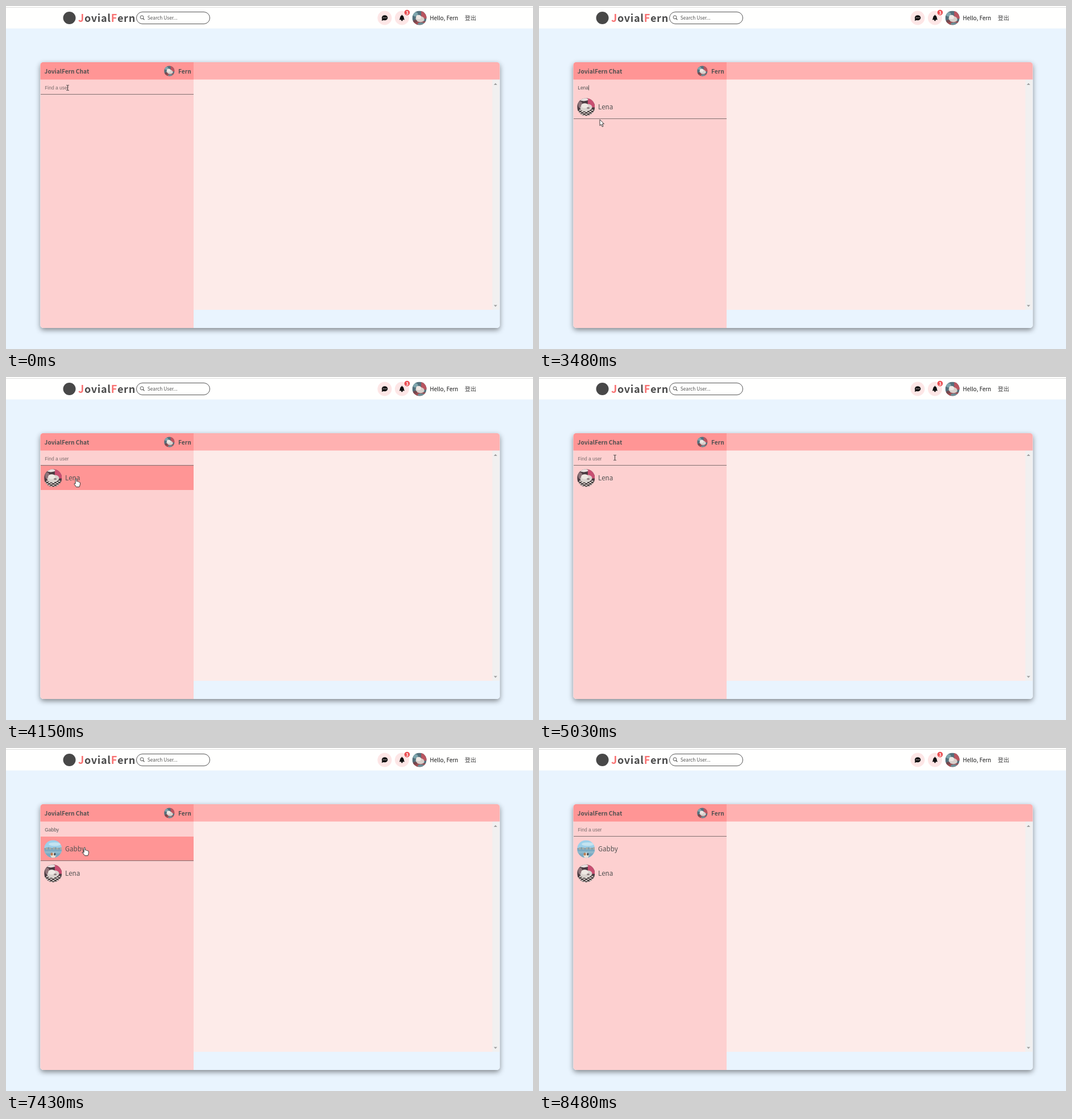
An HTML page with a canvas for the animation above (9.48 s loop, 927 px wide and 604 px high).

```html
<!DOCTYPE html>
<html lang="en">
<head>
<meta charset="utf-8">
<title>JovialFern Chat</title>
<style>
html, body { margin: 0; width: 100%; height: 100%; overflow: hidden; background: #e9f4fe; }
canvas { display: block; width: 927px; height: 604px; }
</style>
</head>
<body>
<canvas id="stage" width="927" height="604"></canvas>
<script>
const ctx = document.getElementById('stage').getContext('2d');
const LOOP = 9480;
const UI = '"Noto Sans CJK TC", "Noto Sans CJK JP", "Noto Sans CJK", sans-serif';
const FIELD = '"Liberation Sans", Arial, sans-serif';
const INK = '#505050', CORAL = '#ff9595', PINK = '#fdd0d0', SKY = '#e9f4fe';
const LEFT = 61, SPLIT = 330, ROW_TOP = 156, ROW_H = 43;

// Pointer hotspot stops: time, x, y
const POINTER = [
  [0, 108, 144], [3060, 108, 144], [3480, 107, 200], [3610, 107, 200],
  [3900, 123, 179], [4200, 123, 179], [4640, 133, 142], [6680, 133, 142],
  [7430, 138, 175], [7640, 138, 175], [8100, 56, 322]
];

// Search field contents from each time on
const TYPED = [
  [0, ''], [840, 'L'], [1220, 'Le'], [1840, 'Len'], [2100, 'Lena'], [4030, ''],
  [5870, 'G'], [5940, 'Ga'], [6010, 'Gabb'], [6080, 'Gabby'], [7640, '']
];

const CARET_ON = [
  [250, 800], [840, 1760], [1840, 2640], [3180, 3710],
  [4500, 5030], [5580, 6420], [6950, 7300]
];

function rect(color, x, y, w, h) {
  ctx.fillStyle = color;
  ctx.fillRect(x, y, w, h);
}

function oval(color, x, y, rx, ry = rx, turn = 0) {
  ctx.fillStyle = color;
  ctx.beginPath();
  ctx.ellipse(x, y, rx, ry, turn, 0, Math.PI * 2);
  ctx.fill();
}

function text(str, x, y, size, weight = 400, color = INK, family = UI) {
  ctx.font = `${weight} ${size}px ${family}`;
  ctx.fillStyle = color;
  ctx.fillText(str, x, y);
  return x + ctx.measureText(str).width;
}

function line(color, width, ...points) {
  ctx.strokeStyle = color;
  ctx.lineWidth = width;
  ctx.beginPath();
  points.forEach(([x, y]) => ctx.lineTo(x, y));
  ctx.stroke();
}

function polygon(color, ...points) {
  ctx.fillStyle = color;
  ctx.beginPath();
  points.forEach(([x, y]) => ctx.lineTo(x, y));
  ctx.closePath();
  ctx.fill();
}

// Paints a round picture in unit-circle coordinates
function avatar(x, y, r, paint) {
  ctx.save();
  ctx.beginPath();
  ctx.arc(x, y, r, 0, Math.PI * 2);
  ctx.clip();
  ctx.translate(x, y);
  ctx.scale(r, r);
  paint();
  ctx.restore();
}

function fernPhoto() {
  rect('#53707c', -1, -1, 2, 2);
  rect('#b9545f', 0.25, -1, 0.8, 1.1);
  oval('#7fa6ad', -0.55, -0.5, 0.35, 0.3);
  rect('#a34b50', -1, 0.5, 2, 0.5);
  oval('#d9d0cc', 0.08, 0.15, 0.62, 0.42, 0.2);
  oval('#efe7e3', -0.12, -0.12, 0.35, 0.3);
  oval('#75494f', -0.6, 0.45, 0.28, 0.2);
  oval('#6c8d96', 0.25, 0.82, 0.5, 0.2);
}

function lenaPhoto() {
  rect('#493a40', -1, -1, 2, 2);
  rect('#c94f72', 0.2, -1, 0.8, 1.05);
  oval('#e8e0df', -0.25, -0.85, 0.5, 0.18);
  oval('#8e7479', -0.65, -0.25, 0.25, 0.4);
  for (let i = 0; i < 9; i++) {
    for (let j = 0; j < 5; j++) {
      rect((i + j) % 2 ? '#d8d1cc' : '#3b3333', -1 + i * 0.23, 0.3 + j * 0.15, 0.23, 0.15);
    }
  }
  oval('#d9d3ce', 0.02, 0.08, 0.68, 0.42, -0.15);
  oval('#eee8e3', -0.15, -0.15, 0.4, 0.28);
  oval('#87777a', 0.25, 0.12, 0.16, 0.09);
}

function gabbyPhoto() {
  rect('#9dd0ea', -1, -1, 2, 2);
  oval('#c4e3f0', 0.2, -0.55, 0.7, 0.2);
  rect('#79a9c2', -1, 0.05, 2, 1);
  for (let i = 0; i < 10; i++) {
    const h = 0.16 + 0.1 * Math.abs(Math.sin(i * 2.3));
    rect(i % 2 ? '#a9a99f' : '#7f9ba6', -1 + i * 0.2, 0.06 - h, 0.18, h);
  }
  rect('#8fb9cb', -1, 0.25, 2, 0.25);
  oval('#e9e3d8', 0.02, 0.72, 0.3, 0.3);
  oval('#b77b52', -0.14, 0.58, 0.14, 0.17);
  oval('#46525a', 0.2, 0.6, 0.11, 0.15);
}

const PEOPLE = { Lena: lenaPhoto, Gabby: gabbyPhoto };

function drawNav() {
  rect('#fffffe', 0, 0, 927, 39.5);
  rect('#dedede', 0, 2, 927, 1);

  oval('#484848', 111.5, 21, 11);
  ctx.letterSpacing = '0.7px';
  let x = 127;
  for (const [part, color] of [['J', '#f87171'], ['ovial', '#4a4a4a'], ['F', '#f87171'], ['ern', '#4a4a4a']]) {
    x = text(part, x, 28, 18, 700, color);
  }
  ctx.letterSpacing = '0px';

  ctx.strokeStyle = '#555';
  ctx.lineWidth = 1;
  ctx.beginPath();
  ctx.roundRect(229.5, 10.5, 129, 21, 10.5);
  ctx.stroke();
  ctx.beginPath();
  ctx.arc(239, 19.8, 2.9, 0, Math.PI * 2);
  ctx.stroke();
  line('#444', 1.1, [241.1, 22], [243.4, 24.3]);
  text('Search User...', 248.7, 23.7, 8.4, 500, '#555');

  oval('#fde6e6', 666, 21, 12.5);
  oval('#111', 666.2, 20.7, 5.2, 4.5);
  polygon('#111', [661.7, 22], [660.9, 25.9], [665.5, 24.5]);
  [-2.4, 0, 2.4].forEach(dx => oval('#fde6e6', 666.2 + dx, 20.7, 0.75));

  oval('#fde6e6', 696.5, 21, 12.5);
  ctx.fillStyle = '#111';
  ctx.beginPath();
  ctx.moveTo(691.8, 24.2);
  ctx.bezierCurveTo(693.8, 22, 692.2, 17, 696.5, 16.4);
  ctx.bezierCurveTo(700.8, 17, 699.2, 22, 701.2, 24.2);
  ctx.closePath();
  ctx.fill();
  oval('#111', 696.5, 16.3, 0.8);
  oval('#111', 696.5, 25, 1.4);
  oval('#ea4b4f', 705.5, 11.5, 4.8);
  text('3', 703.2, 14.5, 8, 700, '#fff');

  avatar(727.2, 21, 12.5, fernPhoto);
  text('Hello, Fern', 745.6, 25.4, 9.9, 500, '#151515');
  text('登出', 807, 25.4, 10, 400, '#444');
}

function panelPath() {
  ctx.roundRect(60.5, 99, 808, 468, 5);
}

function drawPanel() {
  ctx.save();
  ctx.beginPath();
  ctx.rect(0, 0, 927, 604);
  panelPath();
  ctx.clip('evenodd');
  ctx.shadowColor = 'rgba(0,0,0,.45)';
  ctx.shadowBlur = 10;
  ctx.shadowOffsetY = 3.5;
  ctx.fillStyle = SKY;
  ctx.beginPath();
  panelPath();
  ctx.fill();
  ctx.restore();

  ctx.save();
  ctx.beginPath();
  panelPath();
  ctx.clip();
  rect(SKY, 60, 99, 810, 470);
  rect(PINK, 60, 99, SPLIT - 60, 470);
  rect('#fdebe9', SPLIT, 129, 526, 406);
  rect('#f1f0f0', 855.5, 129.5, 13, 405.5);
  rect('#ffb1b1', SPLIT, 99, 539, 30.5);
  rect(CORAL, 60, 99, SPLIT - 60, 30.5);
  ctx.restore();

  polygon('#9d9d9d', [858, 139], [864, 139], [861, 135.8]);
  polygon('#9d9d9d', [858, 526.5], [864, 526.5], [861, 529.7]);
  text('JovialFern Chat', 67.6, 118.6, 10.2, 700);
  avatar(287.3, 114.4, 9.2, fernPhoto);
  text('Fern', 303, 118.6, 10.2, 700);
}

function drawRow(name, index, pointerY) {
  const y = ROW_TOP + index * ROW_H;
  if (pointerY >= y && pointerY < y + ROW_H) rect(CORAL, LEFT, y, SPLIT - LEFT, ROW_H);
  avatar(82.7, y + 21.8, 15.5, PEOPLE[name]);
  text(name, 104, y + 26.3, 11.6, 500);
}

function drawArrow(x, y) {
  ctx.beginPath();
  [[0, 0], [0, 10.6], [2.4, 8.4], [4.2, 12.6], [6, 11.8], [4.2, 7.8], [7.4, 7.6]]
    .forEach(([dx, dy]) => ctx.lineTo(x + dx, y + dy));
  outline();
}

function drawHand(x, y) {
  ctx.beginPath();
  ctx.moveTo(x - 0.9, y + 9);
  ctx.lineTo(x - 0.9, y + 0.8);
  ctx.quadraticCurveTo(x + 0.2, y - 0.9, x + 1.3, y + 0.8);
  ctx.lineTo(x + 1.3, y + 5);
  ctx.quadraticCurveTo(x + 2.8, y + 4, x + 3.6, y + 5.5);
  ctx.quadraticCurveTo(x + 5, y + 4.8, x + 5.6, y + 6.2);
  ctx.quadraticCurveTo(x + 7.5, y + 5.8, x + 7.5, y + 7.8);
  ctx.lineTo(x + 7.3, y + 10.8);
  ctx.lineTo(x + 6, y + 14.6);
  ctx.lineTo(x + 0.5, y + 14.6);
  ctx.lineTo(x - 3, y + 9.4);
  ctx.quadraticCurveTo(x - 2.8, y + 7.4, x - 0.9, y + 9);
  outline();
}

function outline() {
  ctx.closePath();
  ctx.fillStyle = '#fff';
  ctx.fill();
  ctx.strokeStyle = '#222';
  ctx.lineWidth = 0.9;
  ctx.lineJoin = 'round';
  ctx.stroke();
}

function drawBeam(x, y) {
  line('#333', 1, [x + 0.5, y - 4.5], [x + 0.5, y + 4.5]);
  for (const dy of [-4.5, 4.5]) {
    line('#333', 0.9, [x - 1.8, y + dy], [x, y + dy]);
    line('#333', 0.9, [x + 1, y + dy], [x + 2.8, y + dy]);
  }
}

function pointerAt(t) {
  const next = POINTER.findIndex(stop => stop[0] > t);
  if (next < 0) return null;
  const [t0, x0, y0] = POINTER[next - 1], [t1, x1, y1] = POINTER[next];
  const p = (t - t0) / (t1 - t0), eased = p * p * (3 - 2 * p);
  return [x0 + (x1 - x0) * eased, y0 + (y1 - y0) * eased];
}

function draw(t) {
  const pointer = pointerAt(t);
  const pointerY = pointer ? pointer[1] : -1;
  const typed = TYPED.filter(([start]) => start <= t).pop()[1];
  const result = t >= 2720 && t < 4030 ? 'Lena' : t >= 6630 && t < 7640 ? 'Gabby' : '';
  const friends = t >= 7640 ? ['Gabby', 'Lena'] : t >= 4030 ? ['Lena'] : [];
  const rows = result ? [result, ...friends] : friends;

  rect(SKY, 0, 0, 927, 604);
  drawNav();
  drawPanel();
  rows.forEach((name, i) => drawRow(name, i, pointerY));
  rect('#806f6f', LEFT, result ? 198 : 155, SPLIT - LEFT, 1);

  const end = text(typed || 'Find a user', 68.2, 146.8, 8.45, 400, typed ? '#555' : '#7b6d6d', FIELD);
  if (CARET_ON.some(([on, off]) => t >= on && t < off)) {
    rect('#444', Math.round(typed ? end : 68), 139.5, 0.8, 9);
  }

  if (!pointer) return;
  const [x, y] = pointer;
  const overRow = y >= ROW_TOP && y < ROW_TOP + rows.length * ROW_H && x > LEFT;
  if (y < ROW_TOP) drawBeam(Math.round(x), Math.round(y));
  else if (overRow) drawHand(x, y);
  else drawArrow(x, y);
}

const start = performance.now();
function tick() {
  draw((performance.now() - start) % LOOP);
  requestAnimationFrame(tick);
}
tick();
</script>
</body>
</html>
```
